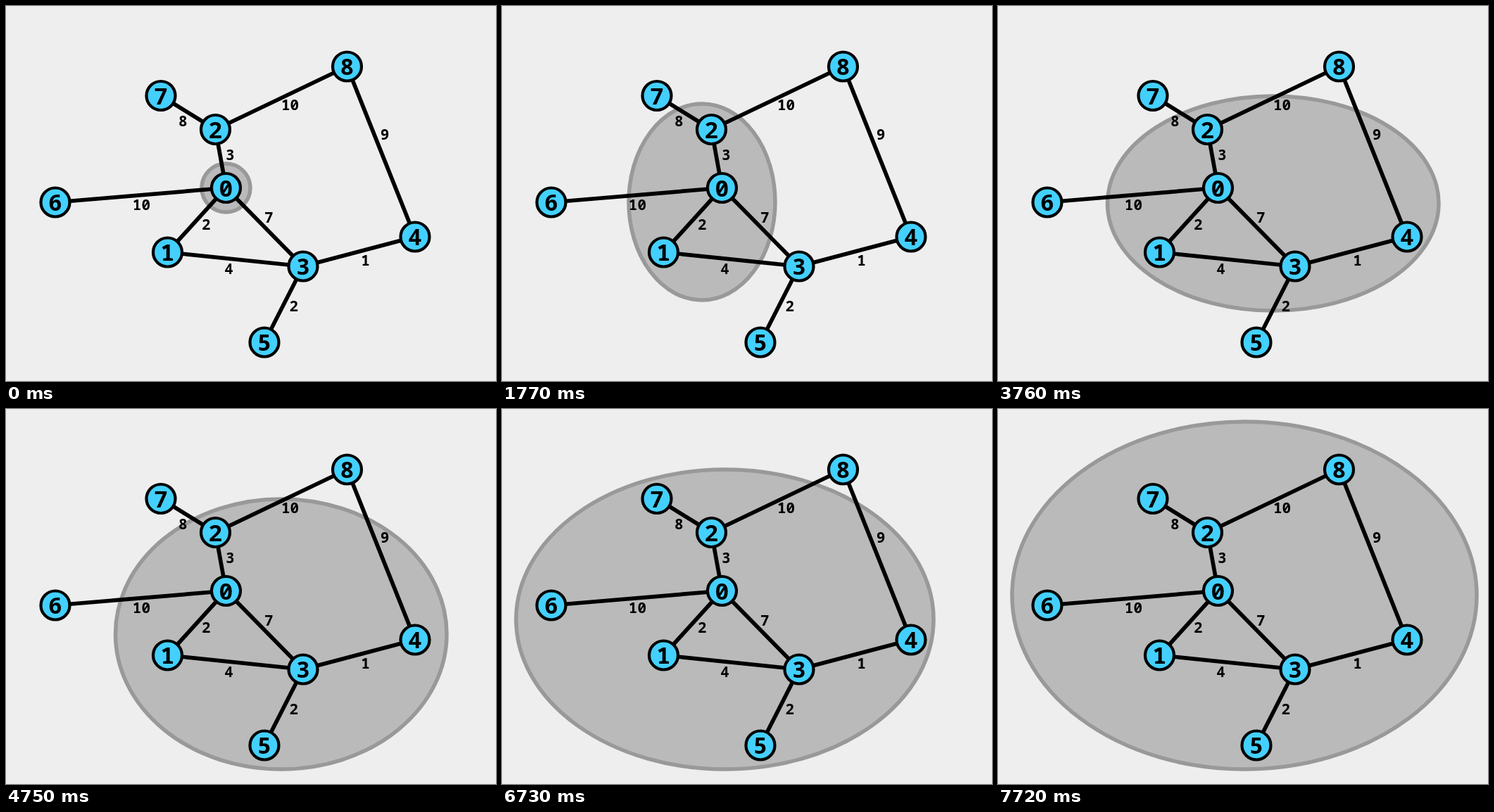
Animation, 696 px wide and 533 px high, one loop 8 s. Source, as an HTML page:

```html
<!DOCTYPE html>
<html lang="en">
<head>
<meta charset="utf-8">
<style>
  html, body { margin: 0; width: 100%; height: 100%; overflow: hidden; background: #eee; }
  svg { display: block; width: 100%; height: 100%; }
  #region { fill: #bababa; stroke: #999; stroke-width: 5.5; }
  line { stroke: #000; stroke-width: 5.7; }
  circle { fill: #43d0ff; stroke: #000; stroke-width: 4.2; }
  text { font: bold 21px "Noto Sans Mono", "DejaVu Sans Mono", monospace; text-anchor: middle; }
  text.node { font-size: 33px; }
</style>
</head>
<body>
<svg viewBox="0 0 696 533">
  <ellipse id="region"/>
  <g id="graph"></g>
</svg>
<script>
const LOOP = 8000, FIRST = 500, PERIOD = 993, STEP = 38.5, STEPS = 8;
const LABEL_GAP = 14;

const nodes = [[312.5, 258.5], [229.5, 350], [297.5, 175.5], [422, 370], [581, 328],
               [367, 478], [70, 279], [220, 127.5], [484.5, 86]];

// from, to, weight, label position along the edge; labels sit on the right-hand side
const edges = [[1, 0, 2], [0, 2, 3], [3, 0, 7], [6, 0, 10, 0.5], [1, 3, 4, 0.46],
               [7, 2, 8, 0.5], [2, 8, 10], [3, 4, 1], [5, 3, 2], [4, 8, 9, 0.58]];

// Each stage moves only some sides of the region
const stages = [{ left: 278, top: 224, right: 347, bottom: 293 }];
for (const moved of [
  { left: 180, top: 204, right: 367, bottom: 403 },
  { top: 139, right: 388, bottom: 418 },
  { left: 172, top: 128, right: 502, bottom: 444 },
  { left: 155.5, right: 626, bottom: 433 },
  { bottom: 512 },
  { left: 20, top: 148 },
  { top: 86, right: 613 },
  { top: 18, right: 680 }
]) stages.push({ ...stages.at(-1), ...moved });

const graph = document.getElementById("graph");
const region = document.getElementById("region");

function setAttrs(el, attrs) {
  for (const name in attrs) el.setAttribute(name, attrs[name]);
}

function add(tag, attrs, text = "") {
  const el = document.createElementNS("http://www.w3.org/2000/svg", tag);
  setAttrs(el, attrs);
  el.textContent = text;
  graph.append(el);
}

for (const [from, to, weight, along = 0.535] of edges) {
  const [x1, y1] = nodes[from], [x2, y2] = nodes[to];
  const dx = x2 - x1, dy = y2 - y1, gap = LABEL_GAP / Math.hypot(dx, dy);
  add("line", { x1, y1, x2, y2 });
  add("text", { x: x1 + dx * along - dy * gap, y: y1 + dy * along + dx * gap + 7.5 }, weight);
}
nodes.forEach(([cx, cy], i) => {
  add("circle", { cx, cy, r: 20.5 });
  add("text", { x: cx, y: cy + 12, class: "node" }, i);
});

const ease = p => p * p * (3 - 2 * p);

function draw(time) {
  const t = time % LOOP - FIRST;
  const stage = Math.max(0, Math.floor(t / PERIOD));
  const step = t < 0 ? 0 : Math.min(STEPS, Math.floor((t - stage * PERIOD) / STEP) + 1);
  const p = ease(step / STEPS);
  const side = name => stages[stage][name] * (1 - p) + stages[stage + 1][name] * p;
  const left = side("left"), right = side("right"), top = side("top"), bottom = side("bottom");
  setAttrs(region, {
    cx: (left + right) / 2, cy: (top + bottom) / 2,
    rx: (right - left) / 2, ry: (bottom - top) / 2
  });
}

const start = performance.now();
function tick() {
  draw(performance.now() - start);
  requestAnimationFrame(tick);
}
tick();
</script>
</body>
</html>
```
